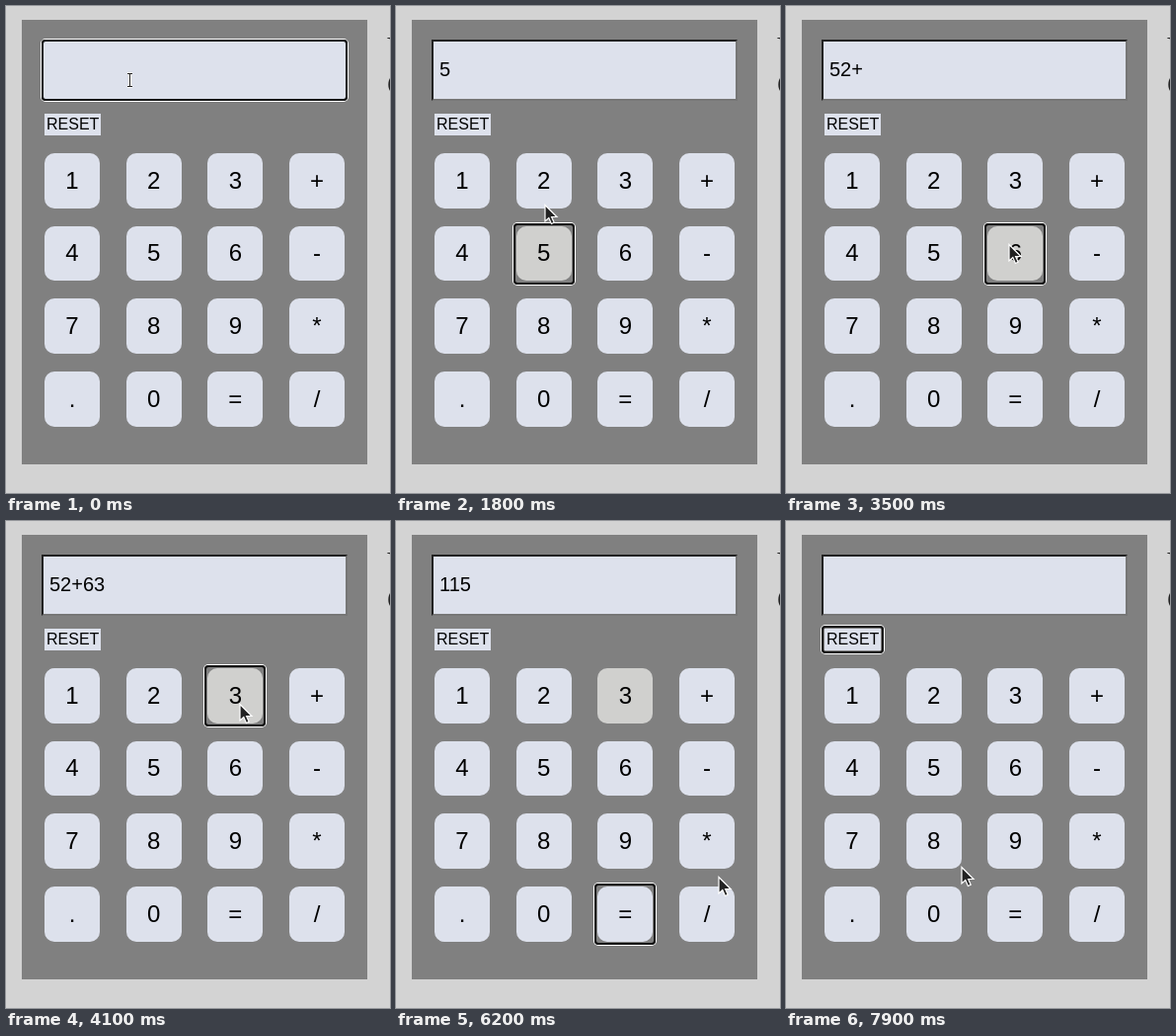
Recreate the animation shown at these times as an HTML page. Size 389 by 493 pixels, loop 8000 ms.

```html
<!DOCTYPE html>
<html>
<head>
<meta charset="utf-8">
<style>
html, body { margin: 0; width: 100%; height: 100%; overflow: hidden; background: #d3d3d3; }
body { position: relative; }
body * { position: absolute; box-sizing: border-box; }
#panel { left: 16px; top: 14px; width: 350px; height: 450px; background: #808080; }
#side { left: 386px; top: 24px; font: 32px/37px "Liberation Serif", serif; color: #222; white-space: pre; }
.key { background: #dde1ec; color: #000; text-align: center; border-radius: 10px;
  padding-top: .6px; font: 24px/54px "Liberation Sans", sans-serif; }
.key.hover { background: #d0d0ce; }
#reset { border-radius: 0; padding: 0; font-size: 16px; line-height: 22px; }
#field { background: #dde1ec; border: 2px solid; border-color: #222 #767676 #767676 #222;
  padding-left: 6px; font: 20px/57px "Liberation Sans", sans-serif; color: #000; }
#caret { left: 44px; top: 54px; width: 1px; height: 22px; background: #000; }
#ring { border: 2px solid #101010; border-radius: 4px; box-shadow: 0 0 0 1px #fff; }
svg { left: 0; top: 0; overflow: visible; }
</style>
</head>
<body>
<div id="panel"></div>
<div id="side">Y
C</div>
<div id="field"></div>
<div id="caret"></div>
<div id="ring"></div>
<svg id="arrow" width="14" height="22">
  <path d="M1 1.5V18L4.8 14.5L7.4 20.5L10.2 19.3L7.6 13.5H13Z" fill="#222" stroke="#fff" stroke-width="1.2"/>
</svg>
<svg id="beam" width="8" height="17" fill="none">
  <path d="M1.5 1.5H6.5M4 1.5V14.5M1.5 14.5H6.5" stroke="#fff" stroke-width="3"/>
  <path d="M1.5 1.5H6.5M4 1.5V14.5M1.5 14.5H6.5" stroke="#222"/>
</svg>
<script>
const $ = id => document.getElementById(id);
const boxes = { field: [36, 34, 310, 62], reset: [39, 109, 57.33, 22] };
const keys = {};

function place(el, [x, y, w, h], grow = 0) {
  el.style.left = x - grow + 'px';
  el.style.top = y - grow + 'px';
  el.style.width = w + 2 * grow + 'px';
  el.style.height = h + 2 * grow + 'px';
}

function addKey(name, label) {
  const el = document.createElement('div');
  el.className = 'key';
  el.id = name;
  el.textContent = label;
  place(el, boxes[name]);
  document.body.insertBefore(el, $('field'));
  keys[name] = el;
}

[...'123+456-789*.0=/'].forEach((c, i) => {
  boxes[c] = [39 + 248 / 3 * (i % 4), 149 + 221 / 3 * (i >> 2), 56, 55.67];
  addKey(c, c);
});
addKey('reset', 'RESET');
place($('field'), boxes.field);

// pointer moves: start, end, x, y
const moves = [
  [0, 1, 126, 75], [600, 1100, 143, 219], [1100, 1200, 150, 263], [1500, 1900, 150, 188],
  [2200, 2300, 298, 188], [2900, 3400, 225, 240], [3600, 3900, 236, 184], [4100, 4600, 233, 391],
  [5700, 6000, 225, 68], [6000, 6100, 232, 160], [6100, 6200, 326, 359], [6200, 6600, 78, 130],
  [6700, 7000, 55, 117], [7400, 7800, 185, 361], [7800, 7900, 177, 349]
];
const presses = [[1400, '5'], [2000, '2'], [2700, '+'], [3500, '6'], [4000, '3'], [4800, '='], [7300, 'reset']];

function pos(t) {
  let [, , x, y] = moves[0];
  for (const [start, end, nx, ny] of moves) {
    const k = Math.min(1, Math.max(0, (t - start) / (end - start)));
    const ease = k * k * (3 - 2 * k);
    x += (nx - x) * ease;
    y += (ny - y) * ease;
  }
  return [Math.round(x), Math.round(y)];
}

const hit = ([px, py]) => Object.keys(boxes).find(n => {
  const [x, y, w, h] = boxes[n];
  return px >= x && px < x + w && py >= y && py < y + h;
});

const pressed = t => presses.filter(p => p[0] <= t).map(p => p[1]);

function type(text, key) {
  if (key === 'reset') return '';
  if (key === '=') return String(text.split('+').reduce((sum, n) => sum + +n, 0));
  return text + key;
}

function draw(now) {
  const t = Math.floor(now % 8000 / 100) * 100;
  const [x, y] = pos(t);
  const over = hit(pos(t - 90)); // hover trails the pointer
  const active = pressed(t).pop() || 'field';
  const typing = hit([x, y]) === 'field';
  for (const n in keys) keys[n].classList.toggle('hover', n === over);
  place($('ring'), boxes[active].map(Math.round), active === 'field' ? 0 : 3);
  $('field').textContent = pressed(t - 100).reduce(type, '');
  $('caret').hidden = active !== 'field' || (t + 1000) % 1100 >= 500;
  $('arrow').style.display = typing ? 'none' : '';
  $('beam').style.display = typing ? '' : 'none';
  $('arrow').style.transform = `translate(${x}px,${y}px)`;
  $('beam').style.transform = `translate(${x - 4.5}px,${y - 8}px)`;
}

function loop() {
  draw(performance.now());
  requestAnimationFrame(loop);
}
loop();
</script>
</body>
</html>
```
